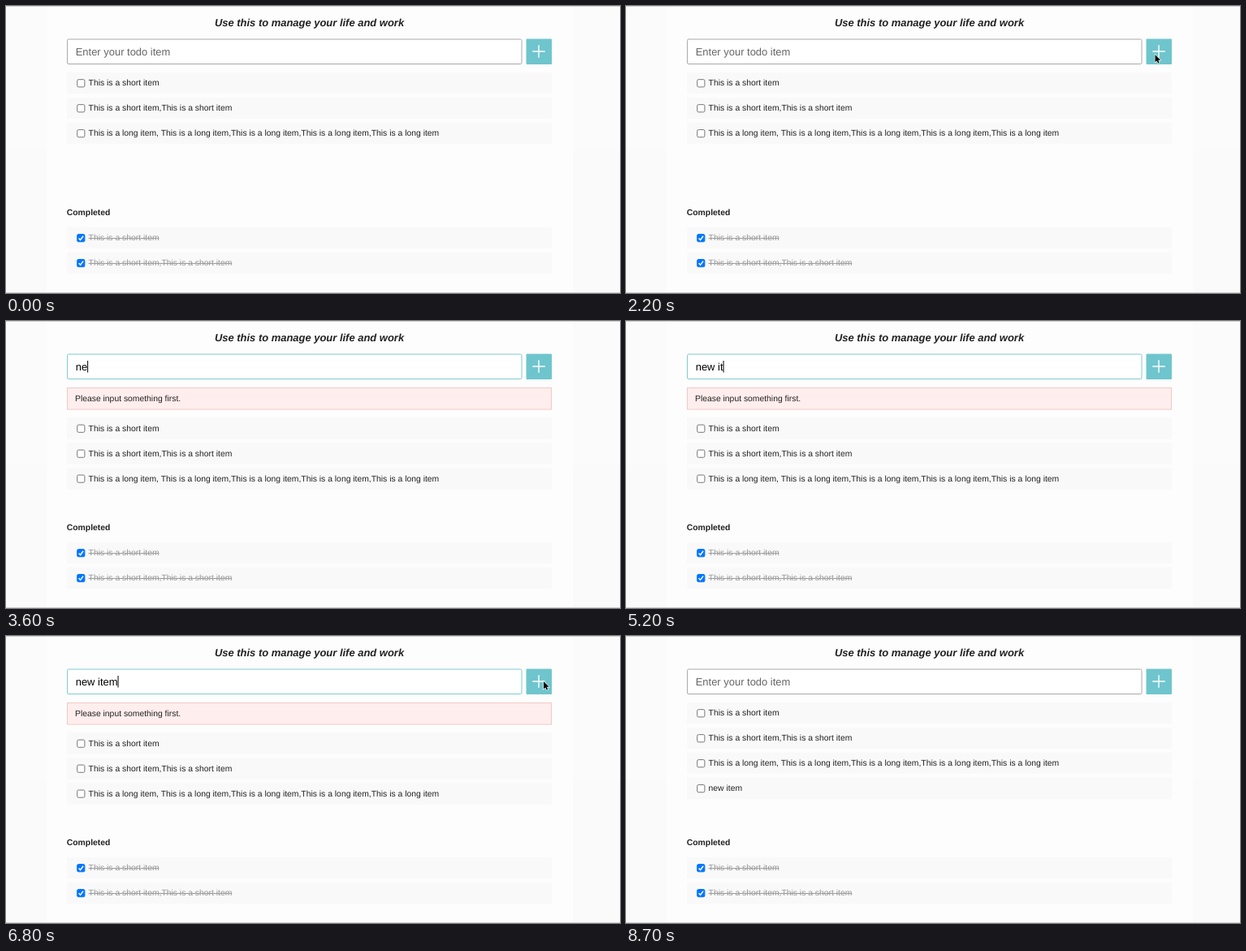
These frames come from a looping animation (756x354 px, 9400 ms). An HTML page:

```html
<!DOCTYPE html>
<html lang="en">
<head>
<meta charset="utf-8">
<title>Todo list</title>
<style>
  html, body { margin: 0; width: 100%; height: 100%; overflow: hidden; background: #fafafa; }
  svg { display: block; width: 756px; height: 354px; }
  text {
    font: 10.37px "Liberation Sans", Arial, sans-serif;
    fill: #222; white-space: pre; text-rendering: geometricPrecision;
  }
  .title { font-size: 12.96px; font-weight: bold; font-style: italic; text-anchor: middle; }
  .field { font-size: 12.96px; }
  .done text { fill: #999; text-decoration: line-through; }
  .box { fill: #fff; stroke: #767676; }
  .done .box { fill: #0075ff; stroke: #0075ff; }
  .tick { fill: none; stroke: #fff; stroke-width: 1.5; }
</style>
</head>
<body>
<svg viewBox="0 0 756 354">
  <rect width="756" height="354" fill="#fafafa"/>
  <rect width="756" height="177" fill="#fbfbfb"/>
  <rect x="50" width="648" height="354" fill="#fdfdfd"/>
  <path d="M0 .5H756M0 353.5H756" stroke="#d2d2d2"/>

  <text class="title" x="373.5" y="25">Use this to manage your life and work</text>

  <rect id="input" x="75.5" y="41" width="559.5" height="30.5" rx="1.5" fill="#fff"/>
  <text id="hint" class="field" x="85.7" y="60.8" style="fill:#666">Enter your todo item</text>
  <text id="typed" class="field" x="85.7" y="60.8" style="fill:#000"></text>
  <rect id="caret" y="49" width="1" height="14.5"/>
  <rect x="640.5" y="40.5" width="31.5" height="31.5" rx="1" fill="#6fc5cd"/>
  <path d="M648.3 56H663.7M656 48.3V63.7" stroke="#fff" stroke-width="1.4"/>

  <g id="error">
    <rect x="75.5" y="82.5" width="596" height="26.5" fill="#ffeeed" stroke="#f3c8c4"/>
    <text x="85" y="99">Please input something first.</text>
  </g>
  <g id="todo"></g>
  <text x="74.8" y="258" style="font-weight:bold">Completed</text>
  <g id="completed" class="done"></g>

  <path id="arrow" d="M0 0V9.3L2.1 7.4L3.6 10.6L5.1 10L3.7 6.8H6.6Z" stroke="#fff" stroke-width="1.2" paint-order="stroke"/>
  <path id="beam" d="M-2 -5.5Q0 -5.5 0 -4Q0 -5.5 2 -5.5M0 -4V4M-2 5.5Q0 5.5 0 4Q0 5.5 2 5.5" fill="none" stroke="#333"/>
</svg>
<script>
const LOOP = 9400, TICK = 100, BLINK = 500, PITCH = 30.95;
const $ = id => document.getElementById(id);

const SHORT = 'This is a short item', LONG = 'This is a long item';
const row = (text, i, top) => `<g transform="translate(0 ${top + i * PITCH})">
  <rect x="75" width="597" height="26.5" fill="#f9f9f9"/>
  <rect class="box" x="87.7" y="8.9" width="9.2" height="9.2" rx="1.6"/>
  ${top > 200 ? '<path class="tick" d="M89.6 13.7L91.6 15.8L95.1 11"/>' : ''}
  <text x="101.6" y="16.6">${text}</text></g>`;
const list = (id, top, items) => $(id).innerHTML = items.map((text, i) => row(text, i, top)).join('');

list('todo', 81.8, [SHORT, `${SHORT},${SHORT}`, `${LONG}, ${Array(4).fill(LONG)}`, 'new item']);
list('completed', 272.7, [SHORT, `${SHORT},${SHORT}`]);
const added = $('todo').lastElementChild;

// [time, pointer, x, y]
const pointer = [
  [0, ''],
  [100, 'arrow', 391, 118], [200, 'arrow', 379, 106], [300, 'arrow', 376, 80],
  [400, 'beam', 376, 60], [500, 'beam', 375, 56],
  [1200, 'beam', 400, 56], [1300, 'beam', 455, 57], [1400, 'beam', 520, 59],
  [1500, 'beam', 570, 62], [1600, 'beam', 597, 65],
  [1700, 'arrow', 608, 73], [1800, 'arrow', 618, 74], [1900, 'arrow', 627, 73],
  [2000, 'arrow', 640, 69], [2100, 'arrow', 648, 63], [2200, 'arrow', 651.5, 60],
  [2600, 'arrow', 644, 58], [2700, 'beam', 615, 56], [2800, 'beam', 597, 55],
  [3500, ''],
  [6000, 'arrow', 705, 38], [6100, 'arrow', 704, 48],
  [6300, 'arrow', 716, 52], [6400, 'arrow', 689, 52.5], [6500, 'arrow', 672, 54],
  [6600, 'arrow', 664, 56], [6700, 'arrow', 662, 56],
  [8600, 'arrow', 690, 65], [8700, '']
];
const focus = [[0, false], [1000, true], [2200, false], [2900, true], [6900, false]];
const error = [[0, false], [2300, true], [6900, false]];
// [time, letters typed]
const WORD = 'new item';
const keys = [[0, 0], [3500, 1], [3600, 2], [3900, 3], [4100, 4], [5000, 5], [5200, 6], [5300, 7], [5400, 8], [6900, 0]];

const at = (steps, t) => steps.findLast(step => step[0] <= t);
const show = (el, on) => el.setAttribute('visibility', on ? 'visible' : 'hidden');

function draw(t) {
  const [focusTime, focused] = at(focus, t);
  const [keyTime, count] = at(keys, t);
  $('input').setAttribute('stroke', focused ? '#80cbd1' : '#aaa');
  $('typed').textContent = WORD.slice(0, count);
  show($('hint'), !count);

  const idle = t - Math.max(focusTime, keyTime);
  show($('caret'), focused && Math.floor(idle / BLINK) % 2 === 0);
  $('caret').setAttribute('x', 85.7 + (count ? $('typed').getComputedTextLength() : 0));

  const failed = at(error, t)[1];
  show($('error'), failed);
  $('todo').setAttribute('transform', `translate(0 ${failed ? 37.4 : 0})`);
  show(added, t >= 6900);

  const [, kind, x, y] = at(pointer, t);
  for (const id of ['arrow', 'beam']) {
    show($(id), kind === id);
    if (kind === id) $(id).setAttribute('transform', `translate(${x} ${y})`);
  }
}

const start = performance.now();
function frame() {
  const t = (performance.now() - start) % LOOP;
  draw(Math.floor(t / TICK) * TICK);
  requestAnimationFrame(frame);
}
frame();
</script>
</body>
</html>
```
